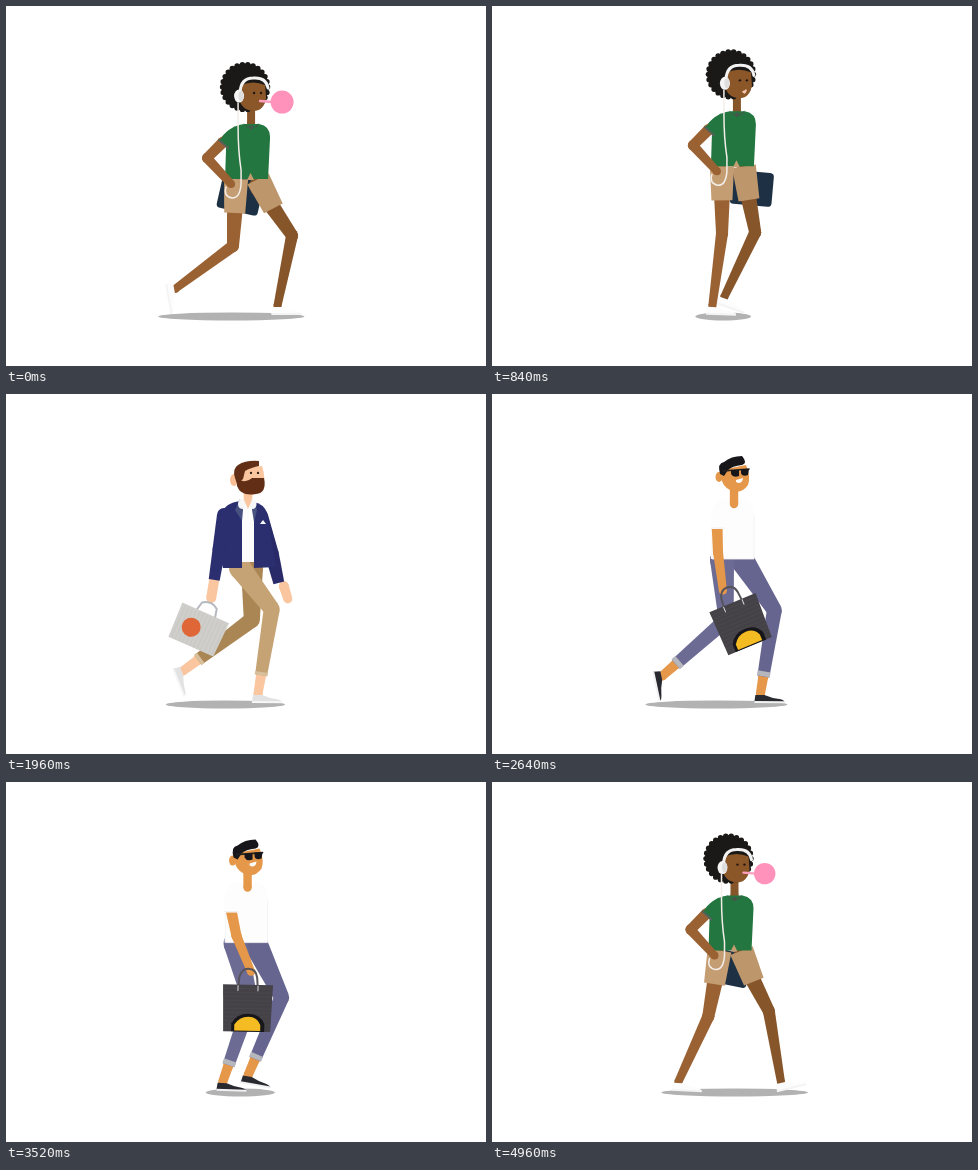
These frames come from a looping animation (480 px wide and 360 px high, 5000 ms). An HTML page with a canvas:

```html
<!DOCTYPE html>
<html lang="en">
<head>
<meta charset="utf-8">
<title>Walkers</title>
<style>
html, body { margin: 0; width: 100%; height: 100%; overflow: hidden; background: #fff; }
canvas { display: block; }
</style>
</head>
<body>
<canvas id="stage" width="480" height="360"></canvas>
<script>
const ctx = document.getElementById('stage').getContext('2d');
const { PI, cos, sin, atan2, acos, hypot, min, max } = Math;
const LOOP = 5000;

// ---------- drawing helpers ----------
function poly(color, ...pts) {
  ctx.beginPath();
  for (let i = 0; i < pts.length; i += 2) ctx.lineTo(pts[i], pts[i + 1]);
  ctx.closePath();
  ctx.fillStyle = color;
  ctx.fill();
}
function shape(color, d) {
  ctx.fillStyle = color;
  ctx.fill(new Path2D(d));
}
function stroke(color, width, d) {
  ctx.strokeStyle = color;
  ctx.lineWidth = width;
  ctx.lineCap = ctx.lineJoin = 'round';
  ctx.stroke(new Path2D(d));
}
function oval(color, x, y, rx, ry = rx) {
  ctx.beginPath();
  ctx.ellipse(x, y, rx, ry, 0, 0, 2 * PI);
  ctx.fillStyle = color;
  ctx.fill();
}
// Tapered limb from a to b, half widths ra and rb
function limb(color, a, b, ra, rb, round = true) {
  const d = hypot(b.x - a.x, b.y - a.y) || 1;
  const nx = -(b.y - a.y) / d, ny = (b.x - a.x) / d;
  poly(color, a.x + nx * ra, a.y + ny * ra, b.x + nx * rb, b.y + ny * rb,
    b.x - nx * rb, b.y - ny * rb, a.x - nx * ra, a.y - ny * ra);
  if (round) {
    oval(color, a.x, a.y, ra);
    oval(color, b.x, b.y, rb);
  }
}
function placed(x, y, turn, draw) {
  ctx.save();
  ctx.translate(x, y);
  ctx.rotate(turn);
  draw();
  ctx.restore();
}
const mix = (a, b, k) => ({ x: a.x + (b.x - a.x) * k, y: a.y + (b.y - a.y) * k });
const rad = deg => deg * PI / 180;

// ---------- walk cycle: one unit of phase is one step ----------
// [phase, ankle x, ankle y, foot angle]
const STRIDE = [
  [0, 293, 300, -18], [0.14, 278, 300, 0], [1.04, 186, 300, 3], [1.2, 169, 283, 80],
  [1.4, 177, 277, 68], [1.72, 235, 292, 17], [1.82, 270, 299, -16], [2, 293, 300, -18]
];
function footAt(phase) {
  const l = ((phase % 2) + 2) % 2;
  const i = STRIDE.findIndex((k, n) => n && l <= k[0]);
  const a = STRIDE[i - 1], b = STRIDE[i], k = (l - a[0]) / (b[0] - a[0]);
  const at = n => a[n] + (b[n] - a[n]) * k;
  return { x: at(1), y: at(2), turn: rad(at(3)) };
}
function kneeOf(hip, foot, thigh, shin) {
  const dx = foot.x - hip.x, dy = foot.y - hip.y;
  const d = min(hypot(dx, dy), thigh + shin - 0.3);
  const bend = acos(max(-1, min(1, (thigh * thigh + d * d - shin * shin) / (2 * thigh * d))));
  const angle = atan2(dy, dx) - bend;
  return { x: hip.x + thigh * cos(angle), y: hip.y + thigh * sin(angle) };
}
function shoe(color, sole, foot) {
  placed(foot.x, foot.y, foot.turn, () => {
    shape(color, 'M-5 1 L4 1 Q11 4 19 5 Q24 6 24 8 L-6 8 Z');
    poly(sole, -6, 7, 24, 7, 24, 9, -6, 9);
  });
}

// ---------- the four walkers ----------
const afroGirl = {
  start: -80, ref: 0, phase: 0.2, step: 240, bob: 6.5,
  hips: [[230, 180], [252, 180]], thigh: 60, shin: 72,
  leg(near, hip, knee, foot) {
    const skin = near ? '#9a6132' : '#87552a';
    limb(skin, hip, knee, 9, 6);
    limb(skin, knee, foot, 6, 4);
    shoe('#fcfcfc', '#f4f4f4', foot);
    limb(near ? '#c49d72' : '#bd966b', { x: hip.x, y: hip.y - 7 }, mix(hip, knee, 0.45), 12, 10.5, false);
  },
  behind(p) {
    const swing = cos(2 * PI * (p - 0.68));
    placed(247 + 13 * swing, 192 + 3 * swing, rad(9 - 4 * swing), () => {
      ctx.beginPath();
      ctx.roundRect(-21, -17, 42, 34, 4);
      ctx.fillStyle = '#1e3144';
      ctx.fill();
    });
  },
  body(p, t) {
    limb('#87552a', { x: 245, y: 98 }, { x: 245, y: 118 }, 4, 4);
    shape('#23763f', 'M238 118 L253 118 Q264 120 264 131 L262 173 L219 173 L220 141 L212 136 Q222 120 238 118 Z');
    poly('#c49d72', 241, 174, 244.5, 167, 248, 174);
    poly('#46574c', 237, 117, 245, 124, 253, 117, 250, 122, 245, 119, 241, 122);
    oval('#1b1917', 239, 81, 23.5);
    for (let i = 0; i < 26; i++) oval('#1b1917', 239 + 22.5 * cos(i * PI / 13), 81 + 22.5 * sin(i * PI / 13), 2.7);
    shape('#8b5729', 'M235 79 Q247 74 259 79 L260 92 Q258 105 247 105 Q235 104 233 92 Z');
    oval('#221712', 248, 87, 1.2);
    oval('#221712', 255, 87, 1.2);
    stroke('#f3f3f3', 3, 'M234 86 Q235 72 247 72 Q260 71 262 82');
    oval('#f5f5f5', 233, 90, 5, 6.5);
    oval('#dedede', 235, 90, 2.5, 5);
    if (t < 400) {
      const r = 11.5 + t * 0.02;
      stroke('#ff9fc0', 2.4, 'M254 95 L266 96');
      oval('#ff92ba', 264.5 + r, 96, r);
    } else {
      shape('#f5c7b5', 'M250 98 Q253 103 255 97 Q254 95 253 97 Z');
    }
    limb('#9a6132', { x: 217, y: 136 }, { x: 201, y: 152 }, 5.5, 5);
    limb('#9a6132', { x: 201, y: 152 }, { x: 225, y: 178 }, 5, 4);
    poly('#23763f', 229, 120, 213, 134, 222, 142, 233, 132);
    stroke('#56615a', 2, 'M213 134 L222 142');
    stroke('#f3eeea', 1.5, 'M232 97 L232 120 Q232 145 235 164 L235 178 Q234 192 226 192 Q217 190 220 181');
  }
};

const beardedMan = {
  start: 1120, ref: 1960, phase: 1.39, step: 240, bob: 4,
  hips: [[234, 174], [246, 174]], thigh: 52, shin: 86,
  leg(near, hip, knee, foot) {
    const cloth = near ? '#c6a374' : '#ab8655';
    const cuff = mix(knee, foot, 0.78);
    limb('#fac69f', cuff, foot, 5, 4.5);
    limb(cloth, hip, knee, 11, 8);
    limb(cloth, knee, cuff, 8, 6, false);
    limb('#d8c09c', mix(knee, foot, 0.74), cuff, 6.5, 6.5, false);
    shoe('#e2e2e2', '#f6f6f6', foot);
  },
  behind(p) {
    const x = 262 - 20 * cos(PI * (p - 0.35));
    limb('#fac69f', { x: x - 4, y: 192 }, { x, y: 205 }, 5, 4.5);
    limb('#282b68', { x: 255, y: 122 }, { x: x - 16, y: 160 }, 7, 7);
    limb('#282b68', { x: x - 16, y: 160 }, { x: x - 9, y: 189 }, 7, 5.5, false);
  },
  body() {
    limb('#fac69f', { x: 242, y: 98 }, { x: 242, y: 113 }, 4.5, 4);
    poly('#fcfcfc', 234, 108, 249, 108, 250, 168, 234, 168);
    shape('#2b2f70', 'M234 107 Q219 109 216 119 L211 150 L217 174 L236 174 L236 121 Z');
    shape('#2b2f70', 'M248 108 Q258 110 261 119 L270 173 L248 174 L248 120 Z');
    shape('#475281', 'M234 105 L229 116 L236 127 L237 116 Z M248 106 L251 116 L248 128 L246 116 Z');
    oval('#f7f7f7', 236, 110, 4, 5);
    oval('#f7f7f7', 247, 110, 3.5, 5);
    poly('#fac69f', 238, 106, 246, 106, 242, 115);
    poly('#fff', 254, 130, 257, 126, 260, 130);
    oval('#f8be95', 228, 86, 4, 6);
    shape('#fac69f', 'M231 74 L256 72 Q260 84 257 94 L235 96 Z');
    shape('#622e15', 'M229 84 Q226 75 232 71 Q240 66 253 67 L253 72 Q244 74 239 77 L237 85 L231 90 Z');
    shape('#622e15', 'M231 83 Q238 91 246 84 L258 84 Q261 99 250 100 Q235 103 231 92 Z');
    oval('#33231a', 245, 79, 1.2);
    oval('#33231a', 252, 79, 1.2);
  },
  front(p) {
    const swing = cos(PI * (p - 0.35));
    const hand = { x: 225 + 20 * swing, y: 204 };
    const wrist = { x: hand.x + 3, y: 186 };
    const elbow = { x: 213 + 8 * (1 + swing), y: 155 };
    limb('#fac69f', wrist, hand, 5, 5);
    limb('#2b2f70', { x: 218, y: 121 }, elbow, 7, 6.5);
    limb('#2b2f70', elbow, wrist, 6.5, 5.5, false);
    placed(hand.x - 1, hand.y + 6, -rad(24) * swing, () => {
      stroke('#b5b8bf', 2, 'M-11 15 L-8 2 Q0 -4 8 2 L11 15');
      poly('#cfcecb', -26, 10, 25, 10, 24, 47, -25, 47);
      for (let x = -22; x < 24; x += 4) stroke('#c4c4c1', 0.6, `M${x} 12 V46`);
      oval('#df6636', -8, 29, 9.5);
    });
  }
};

const sunglassesMan = {
  start: 2370, ref: 2640, phase: 0.23, step: 251, bob: 2.2,
  hips: [[230, 168], [250, 168]], thigh: 58, shin: 85,
  leg(near, hip, knee, foot) {
    const cloth = near ? '#6c6b94' : '#666590';
    const cuff = mix(knee, foot, 0.79);
    limb('#e5974a', cuff, foot, 5, 4.5);
    limb(cloth, { x: hip.x, y: hip.y - 2 }, knee, 12, 7.5);
    limb(cloth, knee, cuff, 7.5, 6, false);
    limb('#b6b6bd', mix(knee, foot, 0.73), cuff, 6.5, 6.5, false);
    shoe('#292930', '#f2f2f2', foot);
  },
  body() {
    shape('#fdfdfd', 'M232 105 L252 105 Q262 107 262 120 L262 165 L219 165 L219 120 Q221 107 232 105 Z');
    stroke('#f1f1f1', 0.8, 'M262 122 V165 H220 V136');
    limb('#e5974a', { x: 242, y: 93 }, { x: 242, y: 110 }, 4.2, 4.2);
    oval('#e5974a', 227, 83, 3.5, 5);
    shape('#e5974a', 'M229 76 L254 71 Q259 83 256 91 Q249 101 238 96 Q230 92 229 83 Z');
    shape('#17171b', 'M228 80 Q225 69 232 68 Q239 62 250 62 Q256 69 250 71 Q240 72 236 76 L232 82 Z');
    stroke('#222', 1.6, 'M231 77 L257 75');
    shape('#17171b', 'M239 76 L247 76 L247 82 Q241 84 239 80 Z M249 75 L257 75 L256 81 Q250 83 249 79 Z');
    shape('#fff', 'M244 86 L251 84 Q250 91 244 88 Z');
  },
  front(p) {
    const swing = cos(PI * (p + 0.35));
    const hand = { x: 234 + 12 * swing, y: 196 - 2 * swing };
    const elbow = { x: 227 + 4 * swing, y: 158 };
    limb('#e5974a', { x: 225, y: 130 }, elbow, 5.5, 5);
    limb('#e5974a', elbow, hand, 5, 4);
    shape('#fdfdfd', 'M219 120 Q222 110 231 112 L232 135 L219 135 Z');
    stroke('#ececec', 0.8, 'M219 134 L232 134');
    const turn = swing > 0 ? -20 + 22 * swing : -20 + 10 * swing;
    placed(hand.x + 3 - 6 * swing, hand.y, rad(turn), () => {
      stroke('#56545a', 2, 'M-10 20 L-9 6 Q-7 -3 0 -3 Q8 -3 9 6 L10 20');
      poly('#454247', -25, 13, 25, 13, 23, 60, -24, 60);
      for (let y = 17; y < 60; y += 4) stroke('#4e4b50', 0.6, `M-23 ${y} H23`);
      stroke('#d5d5d5', 1, 'M-10 14 V19 M10 14 V19');
      shape('#17161a', 'M-16 60 V52 Q-11 42 1 42 Q13 42 17 52 V60 Z');
      shape('#f4bb22', 'M-13 59 V53 Q-8 45 1 45 Q10 45 13 53 V59 Z');
    });
  }
};

const beanieGirl = {
  start: 3630, ref: 4240, phase: 1.79, step: 240, bob: 4,
  hips: [[240, 180], [246, 180]], thigh: 62, shin: 58,
  leg(near, hip, knee, foot) {
    const skin = near ? '#fbcaa0' : '#f3bf93';
    const sock = mix(knee, foot, 0.2);
    limb(skin, hip, knee, 8, 7);
    limb(skin, knee, sock, 7, 7);
    limb('#fdfdfd', sock, foot, 8, 5, false);
    for (const k of [0.27, 0.36]) limb('#303a63', mix(knee, foot, k), mix(knee, foot, k + 0.03), 6.5, 6.5, false);
    shoe('#2b3263', '#ececec', foot);
    const hem = mix(hip, knee, 0.32);
    limb(near ? '#48474e' : '#3f3e45', { x: hip.x, y: hip.y - 7 }, hem, 9, 9.5, false);
    limb('#65646b', mix(hip, knee, 0.24), hem, 9.5, 9.5, false);
  },
  behind() {
    oval('#e6e6e6', 268, 99, 6, 8);
    limb('#fbcaa0', { x: 275, y: 111 }, { x: 275, y: 101 }, 4.5, 4.5);
    stroke('#fbcaa0', 3, 'M273 100 L272 90 M276 100 L277 90');
    limb('#73759a', { x: 258, y: 119 }, { x: 269, y: 139 }, 7, 6);
    limb('#73759a', { x: 269, y: 139 }, { x: 275, y: 110 }, 6, 5, false);
  },
  body() {
    poly('#fafafa', 231, 165, 254, 165, 255, 174, 230, 173);
    poly('#e7e7e9', 230, 96, 246, 96, 247, 110, 228, 110);
    shape('#7c7ea3', 'M230 107 L250 107 Q262 110 262 122 L262 168 L220 170 L220 125 Z');
    stroke('#70729a', 1.5, 'M221 168 L262 167');
    shape('#151a20', 'M227 76 L258 75 L257 82 L238 84 L238 97 L224 96 Q228 88 227 76 Z');
    shape('#fbcaa0', 'M236 80 L257 79 Q259 96 246 97 Q237 97 236 88 Z');
    shape('#151a20', 'M227 76 L258 74 L258 80 L236 81 Z');
    shape('#fff', 'M241 85 L248 85 Q247 92 241 89 Z');
    oval('#33231a', 246, 84, 1);
    oval('#33231a', 253, 84, 1);
    shape('#f95c2b', 'M226 79 Q224 70 231 67 Q234 54 240 53 Q246 54 248 64 Q258 67 258 75 Q241 72 226 79 Z');
    stroke('#111', 4, 'M229 113 Q246 104 256 112 Q263 118 264 128 M238 146 L250 148');
    limb('#9395bb', { x: 248, y: 120 }, { x: 257, y: 152 }, 8, 7);
    limb('#9395bb', { x: 257, y: 152 }, { x: 261, y: 131 }, 6.5, 4.5, false);
    limb('#fbcaa0', { x: 260, y: 127 }, { x: 260, y: 120 }, 4.5, 3.5);
    stroke('#18181b', 2.5, 'M211 110 Q210 101 217 101 Q224 101 223 110');
    shape('#101012', 'M198 158 L198 129 Q200 110 219 110 Q238 110 241 129 L241 159 Q241 163 236 163 L203 163 Q198 163 198 158 Z');
    stroke('#29292d', 1, 'M200 134 H231 V159 H201 Z M232 116 Q237 121 237 160');
    oval('#29292d', 214, 145, 7);
  }
};

const walkers = [afroGirl, beardedMan, sunglassesMan, beanieGirl];

// ---------- scene ----------
function drawWalker(w, t) {
  const p = w.phase + (t - w.ref) / w.step;
  const lift = k => w.bob * cos(2 * PI * (k - 0.24));
  const lean = k => w.bob * 0.45 * cos(2 * PI * (k - 0.45));
  const dx = lean(p) - lean(w.phase), dy = lift(p) - lift(w.phase);
  const feet = [footAt(p - 1), footAt(p)];
  const left = min(feet[0].x, feet[1].x) - 17, right = max(feet[0].x, feet[1].x) + 27;
  const moved = part => part && placed(dx, dy, 0, () => part(p, t));
  const drawLeg = i => {
    const hip = { x: w.hips[i][0] + dx, y: w.hips[i][1] + dy };
    w.leg(i === 0, hip, kneeOf(hip, feet[i], w.thigh, w.shin), feet[i]);
  };
  oval('#b2b2b2', (left + right) / 2, 310.5, (right - left) / 2, 4);
  moved(w.behind);
  drawLeg(1);
  drawLeg(0);
  moved(w.body);
  moved(w.front);
}
function frame() {
  let t = performance.now() % LOOP;
  if (t >= LOOP + afroGirl.start) t -= LOOP;
  ctx.fillStyle = '#fff';
  ctx.fillRect(0, 0, 480, 360);
  drawWalker(walkers.filter(w => t >= w.start).pop(), t);
  requestAnimationFrame(frame);
}
frame();
</script>
</body>
</html>
```
